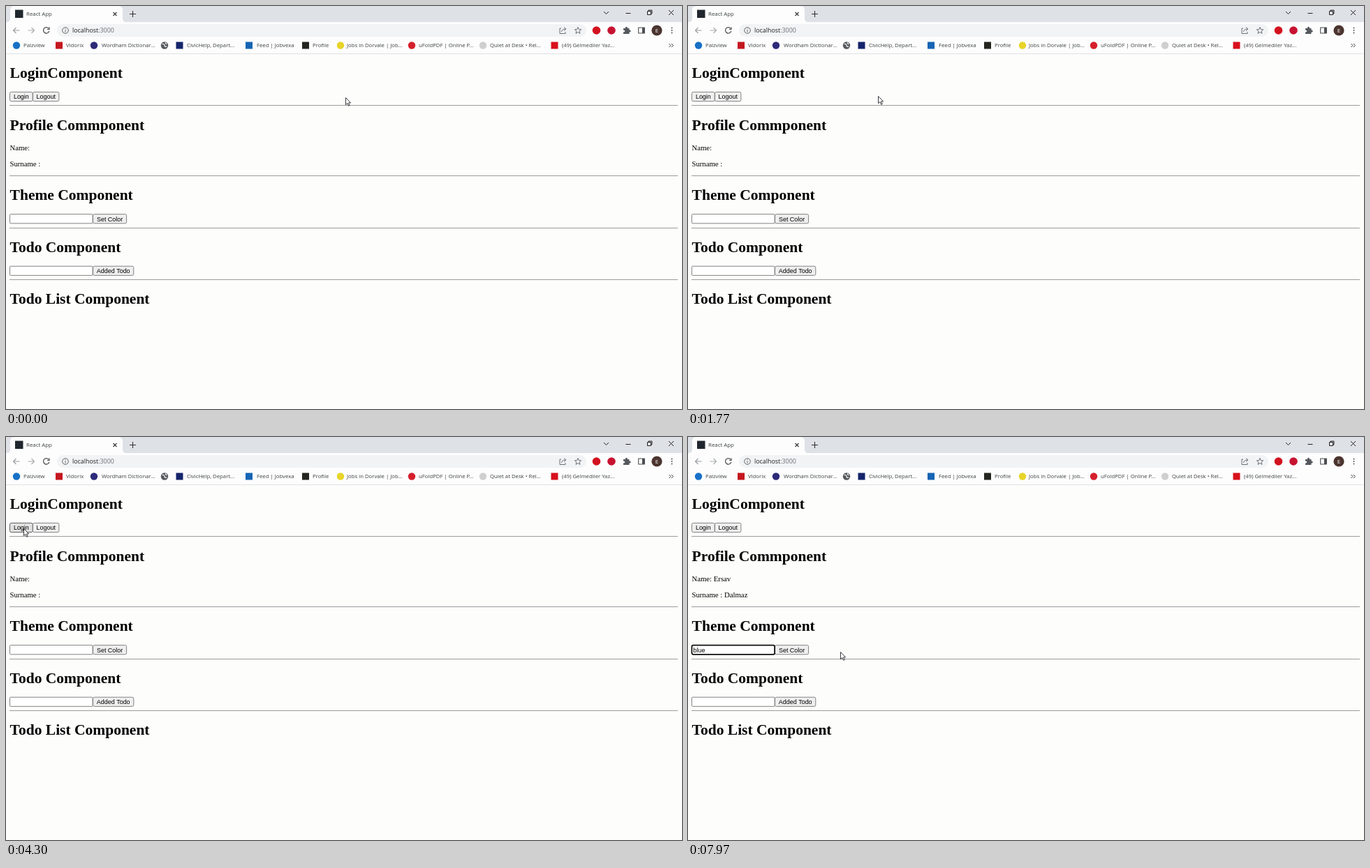
An HTML page with a canvas for the animation above (8 s loop, 968 by 578 pixels).

```html
<!DOCTYPE html>
<html lang="en">
<head>
<meta charset="utf-8">
<title>React App</title>
<style>
  html, body { margin: 0; width: 100%; height: 100%; overflow: hidden; background: #fdfdfc; }
  canvas { display: block; }
</style>
</head>
<body>
<canvas id="stage" width="968" height="578"></canvas>
<script>
const ctx = document.getElementById('stage').getContext('2d');
const LOOP = 8000;
const SERIF = '"Liberation Serif", serif';
const SANS = '"Liberation Sans", sans-serif';
const UI = '"Open Sans", sans-serif';
const INK = '#3c4043';

const LOGIN_AT = 4640;
const FOCUS_AT = 5680;
const TYPED = 'blue';
const KEY_TIMES = [6420, 6720, 6900, 7100];
const BLINK = 530;

// Pointer path: [time, x, y]
const PATH = [
  [0, 486, 131], [460, 542, 116], [1000, 520, 119], [1770, 272, 129], [2500, 48, 135],
  [3100, 31, 134], [4300, 25, 131], [4720, 25, 131], [5200, 92, 286], [5560, 82, 306],
  [7280, 82, 306], [7850, 218, 308], [8000, 218, 308]
];

const HEADINGS = [
  ['LoginComponent', 103, 167], ['Profile Commponent', 177.5, 198], ['Theme Component', 278.3, 182],
  ['Todo Component', 352.8, 164], ['Todo List Component', 427.4, 206]
];

// Bookmarks: [icon x, icon shape, icon colour, text x, label]
const BOOKMARKS = [
  [15, 'circle', '#1771c6', 25, 'Palzview'],
  [76, 'square', '#c4161f', 86, 'Vidorix'],
  [126, 'circle', '#2d2a78', 137, 'Wordham Dictionar...'],
  [227, 'globe', '#55585c', 237, ''],
  [248.5, 'square', '#15246b', 259, 'CivicHelp, Depart...'],
  [348, 'square', '#1565b4', 359, 'Feed | Jobvexa'],
  [429, 'square', '#25251f', 439, 'Profile'],
  [479, 'circle', '#e8d42a', 488, 'Jobs in Dorvale | Job...'],
  [581, 'circle', '#d5202c', 591, 'uFoldPDF | Online P...'],
  [683, 'circle', '#cfcfcf', 693, 'Quiet at Desk • Rel...'],
  [785.5, 'square', '#d8101c', 796, '(49) Gelmediler Yaz...']
];

function text(str, x, y, font, color = '#000', align = 'left') {
  ctx.font = font;
  ctx.fillStyle = color;
  ctx.textAlign = align;
  ctx.fillText(str, x, y);
}

function rect(x, y, w, h, color) {
  ctx.fillStyle = color;
  ctx.fillRect(x, y, w, h);
}

function disc(x, y, r, color) {
  ctx.fillStyle = color;
  ctx.beginPath();
  ctx.arc(x, y, r, 0, 7);
  ctx.fill();
}

function box(x, y, w, h, r, fill, stroke, width = 0.9) {
  ctx.beginPath();
  ctx.roundRect(x, y, w, h, r);
  if (fill) { ctx.fillStyle = fill; ctx.fill(); }
  if (stroke) { ctx.strokeStyle = stroke; ctx.lineWidth = width; ctx.stroke(); }
}

function line(d, color = INK, width = 1, fill) {
  const shape = new Path2D(d);
  if (fill) { ctx.fillStyle = fill; ctx.fill(shape); }
  ctx.strokeStyle = color;
  ctx.lineWidth = width;
  ctx.stroke(shape);
}

function drawTabStrip() {
  rect(0, 0, 968, 23, '#dee1e6');
  ctx.fillStyle = '#fdfdfd';
  ctx.fill(new Path2D('M1 23Q6 23 6 18V6Q6 0 12 0H161Q167 0 167 6V18Q167 23 172 23Z'));
  rect(13, 5.5, 11.5, 11.5, '#20262d');
  text('React App', 29, 14.3, '7.9px ' + UI, INK);
  line('M153.5 9L158.5 14M158.5 9L153.5 14', '#333', 1.1);
  line('M177 11.5H186M181.5 7V16', '#333', 1.1);
  line('M856 8L859.5 11.5L863 8M887.5 10.5H894.5', '#222');
  line('M918.5 7.5H923.5V12.5H918.5ZM920 7V6H925V11H924', '#222');
  line('M949 6L956 13M956 6L949 13', '#222');
}

function drawToolbar() {
  rect(0, 23, 968, 46, '#fdfdfd');
  line('M19.5 35H10.5M14.5 31L10.5 35L14.5 39', '#969a9e', 1.1);
  line('M31.5 35H40.5M36.5 31L40.5 35L36.5 39', '#a6a9ac', 1.1);
  line('M61 32.2A4.2 4.2 0 1 0 61.8 36M62 30.5V33.5H59', '#44474b', 1.2);
  box(73, 26, 758, 18, 9, '#f1f3f4');
  line('M89.3 35A4.3 4.3 0 1 1 80.7 35A4.3 4.3 0 1 1 89.3 35M85 34.3V37.5M85 32.3V33.3', '#555', 0.9);
  text('localhost', 95, 38.2, '8.9px ' + UI, '#202124');
  text(':3000', 95 + ctx.measureText('localhost').width, 38.2, '8.9px ' + UI, '#6a6e73');

  line('M795 32H793V39.5H801V37M795.5 37Q796 33 801 33M799 30.5L802 33L799 35.5', '#5f6368', 0.9);
  line('M819 30.4L820.3 33.6L823.7 33.8L821.1 36L822 39.4L819 37.5L816 39.4L816.9 36L814.3 33.8L817.7 33.6Z', '#5f6368', 0.9);
  disc(845.5, 35, 5.8, '#d3121f');
  disc(867, 35, 5.8, '#c71231');
  ctx.fillStyle = '#55595e';
  ctx.fill(new Path2D('M884 32H887A1.6 1.6 0 1 1 890 32H892.5V34.5A1.6 1.6 0 1 1 892.5 37.5V40H884V37.5A1.6 1.6 0 1 0 884 34.5Z'));
  line('M905.7 31H914.3V39H905.7Z', '#4a4d51', 1.1);
  rect(911, 31, 3.5, 8, '#4a4d51');
  disc(932, 35, 7.6, '#4b342f');
  text('E', 932, 38, '8px ' + UI, '#fff', 'center');
  for (const y of [31.5, 35, 38.5]) disc(953.5, y, 0.9, '#44474b');
}

function drawBookmarks() {
  for (const [x, shape, color, labelX, label] of BOOKMARKS) {
    if (shape === 'square') rect(x - 5, 51.5, 10, 10, color);
    else disc(x, 56.5, 5.2, color);
    if (shape === 'globe') line('M223.5 54.5Q227 54 227 56.5T230.5 58M228 52.5L230 55', '#f4f4f4', 1.3);
    text(label, labelX, 59.3, '7.75px ' + UI, INK);
  }
  line('M949.5 54L952 56.5L949.5 59M953 54L955.5 56.5L953 59', INK, 1);
  rect(0, 68, 968, 1, '#dfe1e4');
}

function drawButton(label, x, y, w, hovered) {
  box(x, y, w, 13.2, 2, hovered ? '#e2e2e2' : '#efefef', hovered ? '#4f4f4f' : '#767676');
  text(label, x + w / 2, y + 9.9, '8.96px ' + SANS, '#000', 'center');
}

function drawInput(y, value, focused, caretOn) {
  box(5.5, y, 118.6, 13.2, focused ? 2 : 1, '#fff', focused ? '#101010' : '#767676', focused ? 1.8 : 0.9);
  text(value, 7.6, y + 9.9, '8.96px ' + SANS);
  if (caretOn) rect(Math.round(7.6 + ctx.measureText(value).width), y + 2, 1, 10, '#000');
}

function drawPage(t, pointer) {
  rect(0, 69, 968, 509, '#fdfdfc');
  for (const [label, y] of HEADINGS) text(label, 5.6, y, 'bold 21.5px ' + SERIF);
  for (const y of [142, 243, 318, 392]) rect(5, y, 957, 1, '#9c9c9c');

  const loggedIn = t >= LOGIN_AT;
  text('Name: ' + (loggedIn ? 'Ersav' : ''), 5.4, 207, '10.75px ' + SERIF);
  text('Surname : ' + (loggedIn ? 'Dalmaz' : ''), 5.4, 230, '10.75px ' + SERIF);

  const over = (x, y, w, h) =>
    pointer.x >= x && pointer.x <= x + w && pointer.y >= y && pointer.y <= y + h;
  drawButton('Login', 5.5, 123.4, 32.7, over(5, 123, 33, 14));
  drawButton('Logout', 38.5, 123.4, 37.4, over(38.5, 123, 38, 14));
  drawButton('Set Color', 124.6, 298.6, 48, over(124.6, 298, 48, 14));
  drawButton('Added Todo', 124.6, 373.2, 58.2, over(124.6, 373, 58, 14));

  const count = KEY_TIMES.filter(k => t >= k).length;
  const lastEvent = count ? KEY_TIMES[count - 1] : FOCUS_AT;
  const focused = t >= FOCUS_AT;
  const caretOn = focused && (t - lastEvent) % (2 * BLINK) < BLINK;
  drawInput(298.6, TYPED.slice(0, count), focused, caretOn);
  drawInput(373.2, '', false, false);
}

function pointerAt(t) {
  const i = PATH.findIndex(key => key[0] > t);
  const [t0, x0, y0] = PATH[i - 1];
  const [t1, x1, y1] = PATH[i];
  const u = (t - t0) / (t1 - t0);
  const s = u * u * (3 - 2 * u);
  return { x: x0 + (x1 - x0) * s, y: y0 + (y1 - y0) * s };
}

function drawPointer({ x, y }) {
  const overInput = x > 5 && x < 124 && y > 298 && y < 312;
  const overHeading = HEADINGS.some(([, base, right]) => x < right && y > base - 19 && y < base + 8);
  ctx.save();
  ctx.translate(Math.round(x), Math.round(y));
  if (overInput || overHeading) {
    line('M-2.5 -5H-.5L.5 -4.5L1.5 -5H3.5M.5 -4.5V5M-2.5 5.5H-.5L.5 5L1.5 5.5H3.5', '#222', 1);
  } else {
    line('M.5 .5V10.7L2.9 8.5L4.6 12.3L6.2 11.6L4.6 7.9H7.6Z', '#26262c', 0.9, '#fff');
  }
  ctx.restore();
}

function frame(now) {
  const t = now % LOOP;
  const pointer = pointerAt(t);
  drawTabStrip();
  drawToolbar();
  drawBookmarks();
  drawPage(t, pointer);
  drawPointer(pointer);
  requestAnimationFrame(() => frame(performance.now()));
}
frame(0);
</script>
</body>
</html>
```
